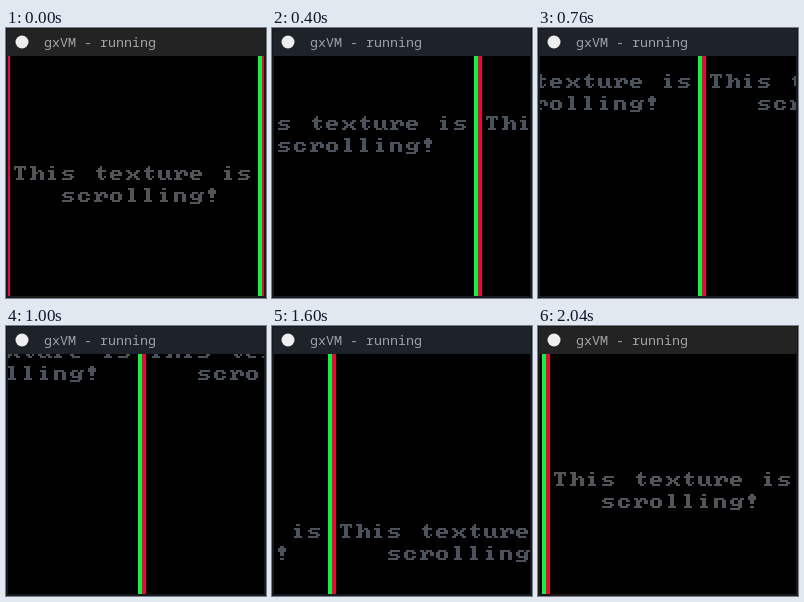
An HTML page that plays this animation: 260 by 270 pixels, repeating every 2.08 s.

```html
<!DOCTYPE html>
<html lang="en">
<head>
<meta charset="utf-8">
<title>Scrolling texture</title>
<style>
  html, body { margin: 0; width: 100%; height: 100%; overflow: hidden; background: #000; }
  svg { display: block; width: 260px; height: 270px; }
  #title { font: 13.33px "Noto Sans Mono", "DejaVu Sans Mono", monospace; }
</style>
</head>
<body>
<svg viewBox="0 0 260 270">
  <defs>
    <pattern id="texture" width="256" height="256" patternUnits="userSpaceOnUse">
      <rect width="256" height="256" fill="#000"/>
      <rect width="4" height="256" fill="#e00a3c"/>
      <rect x="252" width="4" height="256" fill="#14f03e"/>
      <g id="lettering" fill="none" shape-rendering="crispEdges"/>
    </pattern>
  </defs>
  <rect id="frame" width="260" height="270"/>
  <rect id="bar" x="1" y="1" width="258" height="27"/>
  <circle cx="16" cy="14" r="6.5" fill="#eee"/>
  <text id="title" x="38" y="19">gxVM - running</text>
  <rect x="2" y="28" width="256" height="240" fill="url(#texture)" role="img"
        aria-label="This texture is scrolling!"/>
</svg>
<script>
const STEP = 40, STEPS = 52;
const byId = id => document.getElementById(id);

// Each letter on an 8-unit cell: [two-unit stems, one-unit horizontal strokes]
const glyphs = {
  T: ['M3 0v6', 'M0 0h6M0 1h1M5 1h1M1 6h4'],
  h: ['M2 0v7M6 3v4', 'M0 0h1M4 2h2M3 3h1M0 6h1'],
  i: ['M3 0v1M3 2v5', 'M1 2h1M1 6h4'],
  s: ['', 'M1 2h5M0 3h2M1 4h4M4 5h2M0 6h5'],
  t: ['M3 1v5', 'M3 0h1M1 2h5M5 5h1M3 6h2'],
  e: ['M1 3v3M5 3v2', 'M1 2h4M2 4h2M1 6h4'],
  x: ['', 'M0 2h2M5 2h2M1 3h2M4 3h2M2 4h3M1 5h2M4 5h2M0 6h2M5 6h2'],
  u: ['M1 2v4M5 2v4', 'M1 6h3M5 6h2'],
  r: ['M2 3v3M6 3v2', 'M0 2h2M3 2h3M3 3h1M0 6h4'],
  c: ['M1 3v3', 'M1 2h4M4 3h2M4 5h2M1 6h4'],
  o: ['M1 3v3M5 3v3', 'M1 2h4M1 6h4'],
  l: ['M3 0v6', 'M1 0h1M1 6h4'],
  n: ['M1 2v5M5 3v4', 'M2 2h3'],
  g: ['M1 3v2M5 3v4', 'M1 2h3M5 2h2M1 5h3M0 7h5'],
  '!': ['M3 0v5M3 6v1', 'M1 1h4M1 2h4']
};

function line(text, x, y) {
  return [...text].map((char, i) => {
    if (!glyphs[char]) return '';
    const [stems, strokes] = glyphs[char];
    return `<g transform="translate(${x + i * 16} ${y}) scale(2)">
      <path d="${stems}" stroke-width="2"/>
      <path d="${strokes}" transform="translate(0 .5)"/></g>`;
  }).join('');
}

byId('lettering').innerHTML =
  line('This texture is', 8, 138) + line('scrolling!', 56, 160);

// The scroll speed wavers slightly: [step, distance]
const pace = [[0, 0], [10, 50], [19, 92], [25, 120], [32, 154], [40, 196], [51, 248]];

function distance(step) {
  const k = pace.findIndex(([end], i) => i > 0 && step <= end);
  const [a, from] = pace[k - 1], [b, to] = pace[k];
  return 2 * Math.round((from + (to - from) * (step - a) / (b - a)) / 2);
}

function draw(time) {
  const step = Math.floor(time / STEP) % STEPS;
  const d = distance(step);
  const neutral = step < 1 || step > 49;
  byId('texture').setAttribute('patternTransform', `translate(${-d} ${-d})`);
  byId('frame').setAttribute('fill', neutral ? '#1a1a1a' : '#171a1f');
  byId('bar').setAttribute('fill', neutral ? '#232323' : '#1e2229');
  byId('title').setAttribute('fill', neutral ? '#a4a4a4' : '#9da2aa');
  byId('lettering').setAttribute('stroke', neutral ? '#545456' : '#4c525c');
}

const start = performance.now();
function tick() {
  draw(performance.now() - start);
  requestAnimationFrame(tick);
}
tick();
</script>
</body>
</html>
```
